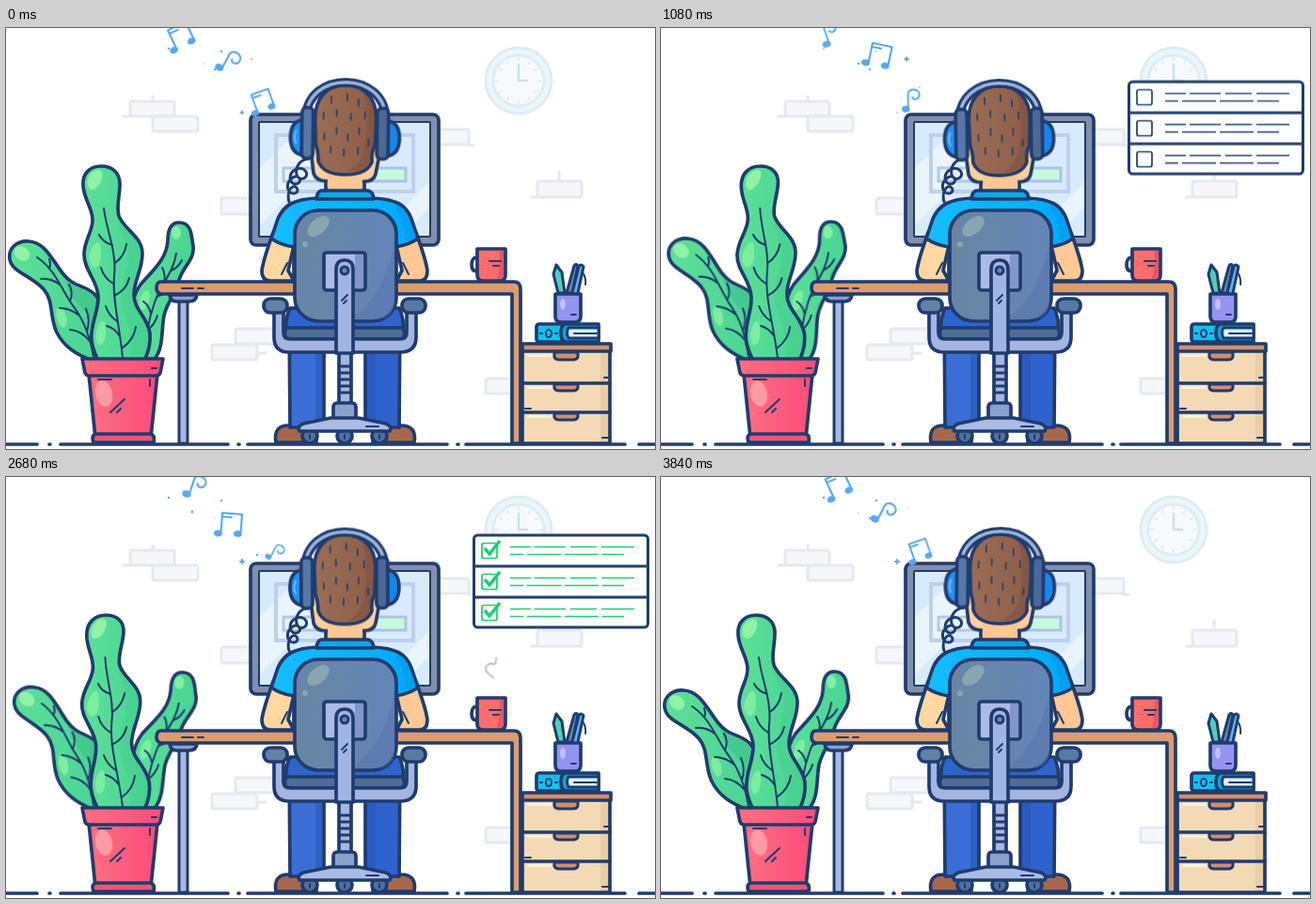
An HTML page that plays this animation: 690 by 448 pixels, repeating every 3.88 s.

```html
<!DOCTYPE html>
<html lang="en">
<head>
<meta charset="utf-8">
<title>Working at the desk</title>
<style>
html, body { margin: 0; width: 100%; height: 100%; overflow: hidden; background: #fff; }
svg { display: block; width: 690px; height: 448px; }
.ink { stroke: #203c6e; stroke-width: 3.7; stroke-linecap: round; stroke-linejoin: round; }
.mid { stroke-width: 3; }
.thin { stroke-width: 2; }
.hair { stroke-width: 1.6; }
.line { fill: none; }
.bare { stroke: none; }
.wall { fill: #f5f7fa; stroke: #e5e9f0; stroke-width: 3; stroke-linecap: round; stroke-linejoin: round; }

.sway { animation: 1940ms cubic-bezier(.37, 0, .63, 1) infinite alternate; }
#leafL { transform-origin: 100px 352px; animation-name: leanL; }
#leafR { transform-origin: 150px 352px; animation-name: leanR; animation-delay: -2910ms; }
#head { transform-origin: 360px 150px; animation-name: nod; animation-duration: 970ms; animation-delay: -1770ms; }
@keyframes leanL { to { transform: rotate(3.8deg); } }
@keyframes leanR { from { transform: rotate(-1.55deg); } to { transform: rotate(1.55deg); } }
@keyframes nod { from { transform: rotate(.8deg); } to { transform: translateY(1px) rotate(-.8deg); } }

.note { fill: none; stroke: #55a7f5; stroke-width: 2.2; stroke-linecap: round; stroke-linejoin: round;
  animation: drift 3880ms linear infinite, 3880ms ease-in-out infinite; }
.dot { fill: #55a7f5; stroke: none; }
.pair { animation-name: drift, swingPair; }
.solo { animation-name: drift, swingSolo; }
@keyframes drift {
  0%, 6% { translate: 312px 95px; scale: .2; opacity: 0; }
  9% { translate: 307px 86px; scale: .55; opacity: .7; }
  17% { translate: 290px 80px; scale: .7; opacity: 1; }
  25% { translate: 271px 78px; scale: .9; }
  34% { translate: 248px 75px; scale: .95; }
  42% { translate: 238px 55px; scale: 1; }
  50% { translate: 235px 35px; scale: 1; }
  59% { translate: 221px 14px; scale: 1; }
  67% { translate: 204px 10px; scale: 1; }
  75% { translate: 184px 9px; scale: 1; opacity: 1; }
  84% { translate: 161px 4px; scale: .75; opacity: .9; }
  92%, 100% { translate: 148px -14px; scale: .5; opacity: 0; }
}
@keyframes swingPair {
  0%, 15% { rotate: 10deg; } 25% { rotate: -20deg; } 34% { rotate: -5deg; }
  53% { rotate: 12deg; } 75%, 100% { rotate: -25deg; }
}
@keyframes swingSolo {
  0%, 9% { rotate: 0deg; } 20% { rotate: 28deg; } 30% { rotate: -4deg; } 42% { rotate: 8deg; }
  50% { rotate: 28deg; } 59% { rotate: 12deg; } 70% { rotate: 18deg; } 79%, 100% { rotate: -20deg; }
}
.spark { stroke: #55a7f5; stroke-width: 2; stroke-linecap: round; animation: spark 970ms linear infinite; }
@keyframes spark { 0%, 75%, 100% { scale: 0; } 20%, 55% { scale: 1; } }

#list { animation: show 3880ms linear infinite; }
@keyframes show { 0%, 7% { opacity: 0; } 16%, 77% { opacity: 1; } 92%, 100% { opacity: 0; } }
#bob { animation: bob 970ms infinite; animation-delay: -630ms; }
@keyframes bob {
  0%, 100% { transform: translateY(52px); animation-timing-function: cubic-bezier(.37, 0, .63, 1); }
  36% { transform: translateY(62px); animation-timing-function: cubic-bezier(.5, 0, .75, .8); }
}
#steam { animation: steam 3880ms linear infinite; }
@keyframes steam {
  0%, 40% { stroke-dasharray: 0 0 0 2; transform: none; opacity: 0; }
  41% { opacity: 1; }
  57%, 62% { stroke-dasharray: 0 0 1 2; transform: none; }
  79% { stroke-dasharray: 0 .78 .22 2; transform: translate(-6px, -8px); opacity: 1; }
  83%, 100% { stroke-dasharray: 0 1 0 2; transform: translate(-7px, -10px); opacity: 0; }
}
</style>
</head>
<body>
<svg viewBox="0 0 690 448">
<defs>
  <linearGradient id="shirt"><stop offset="0" stop-color="#16bdff"/><stop offset="1" stop-color="#00a8fb"/></linearGradient>
  <linearGradient id="pad"><stop offset="0" stop-color="#6886a3"/><stop offset="1" stop-color="#6385b8"/></linearGradient>
  <linearGradient id="hair"><stop offset="0" stop-color="#9c6d55"/><stop offset="1" stop-color="#8c5d49"/></linearGradient>
  <linearGradient id="leaf"><stop offset="0" stop-color="#5ce098"/><stop offset="1" stop-color="#4ad394"/></linearGradient>
  <linearGradient id="pot"><stop offset="0" stop-color="#ff6f80"/><stop offset="1" stop-color="#fb4c7c"/></linearGradient>
  <clipPath id="screen"><path d="M269 100H451V222H269Z"/></clipPath>
  <g id="pair"><path d="M-8 11V-11H13V10M-8 -7H2"/><ellipse class="dot" cx="-11" cy="11" rx="4.6" ry="3.6"/><ellipse class="dot" cx="10" cy="10" rx="4.6" ry="3.6"/></g>
  <g id="solo"><path d="M-1 10V-8C0 -15 13 -13 12 -6C11 0 4 0 4 -4"/><ellipse class="dot" cx="-4" cy="10" rx="4.8" ry="3.8"/></g>
</defs>

<g class="wall">
  <rect x="132" y="78" width="47" height="16" rx="2"/><rect x="156" y="94" width="48" height="16" rx="2"/>
  <rect x="445" y="108" width="47" height="16" rx="2"/><rect x="565" y="163" width="47" height="17" rx="2"/>
  <rect x="229" y="181" width="47" height="17" rx="2"/><rect x="244" y="320" width="47" height="16" rx="2"/>
  <rect x="219" y="337" width="48" height="16" rx="2"/><rect x="510" y="373" width="40" height="16" rx="2"/>
  <path class="line" d="M125 94h7M156 73v5M492 125h5M559 180h6M588 153v8M267 346h9"/>
</g>
<g stroke="#e0ecf3" stroke-width="3" stroke-linecap="round">
  <circle cx="545" cy="56" r="35" fill="#eaf6fa"/><circle cx="545" cy="56" r="27" fill="#f6fafc"/>
  <path class="line" stroke="#cfdeed" stroke-width="2.5" d="M545 39V56H554"/>
  <path class="line" stroke-width="2" d="M545 32v2M545 78v2M521 56h2M567 56h2M533 36l1 2M557 36l-1 2M525 44l2 1M565 44l-2 1M525 68l2 -1M565 68l-2 -1M533 76l1 -2M557 76l-1 -2"/>
</g>

<g id="list">
  <g id="bob">
    <rect class="ink mid" x="497.5" width="185" height="98" rx="4" fill="#fff"/>
    <path class="ink mid" d="M498 33H682M498 66H682"/>
  </g>
</g>

<!-- monitor -->
<rect class="ink" x="260" y="92" width="200" height="139" rx="6" fill="#8190ac"/>
<rect x="269" y="100" width="182" height="122" fill="#d8eafd"/>
<g clip-path="url(#screen)">
  <path fill="#e9f4ff" d="M269 150L320 100H380L269 211ZM392 222L451 163V190L420 222Z"/>
  <rect x="287" y="114" width="146" height="60" fill="none" stroke="#bdd0ec" stroke-width="4"/>
  <rect x="295" y="149" width="60" height="14" fill="#e7f3ff" stroke="#b4c8e7" stroke-width="3"/>
  <rect x="375" y="149" width="50" height="14" fill="#c8f8e0" stroke="#acc3e6" stroke-width="3"/>
</g>
<rect class="ink line thin" x="269" y="100" width="182" height="122" rx="1"/>

<!-- plant -->
<g id="leafL" class="sway">
  <path class="ink" fill="url(#leaf)" d="M24 227C11 226 2 235 4 246C6 260 28 264 40 278C51 290 46 308 54 324C62 340 76 348 92 354L106 354C108 330 106 296 94 283C83 273 72 276 61 262C49 247 42 228 24 227Z"/>
  <path class="bare" fill="#38bd87" opacity=".5" d="M63 267C75 278 91 278 96 291C103 309 102 330 100 350C92 335 93 315 83 301C75 291 65 284 63 267Z"/>
  <ellipse cx="17" cy="240" rx="9" ry="7" fill="#8ff2a6" transform="rotate(35 17 240)"/>
  <ellipse cx="59" cy="308" rx="5" ry="11" fill="#7deda0" transform="rotate(-15 59 308)"/>
  <path class="ink line thin" d="M33 244C54 258 60 282 73 298C84 313 90 333 93 350M46 256Q48 251 46 246M57 273Q48 266 37 267M68 291Q72 281 67 273M78 306Q68 298 57 298M86 323Q90 310 85 299M89 333Q80 322 68 321"/>
</g>
<g id="leafR" class="sway">
  <path class="ink" fill="url(#leaf)" d="M184 207C174 207 172 216 172 226C171 246 156 258 143 273C130 290 130 320 138 352H158C168 340 165 320 168 306C171 292 180 284 184 268C188 254 201 246 199 232C197 222 198 207 184 207Z"/>
  <ellipse cx="181" cy="218" rx="5" ry="7" fill="#84efa3"/>
  <ellipse cx="147" cy="290" rx="5" ry="11" fill="#7deda0" transform="rotate(18 147 290)"/>
  <path class="ink line thin" d="M181 240C178 260 164 274 158 292C151 312 148 332 148 350M176 258Q183 255 187 247M168 272Q170 262 166 255M160 286Q169 284 174 275M154 304Q152 295 146 291M150 322Q158 316 161 306"/>
</g>
<g id="leafM">
  <path class="ink" fill="url(#leaf)" d="M101,147 C89,147 81,155 82,168 C83,182 91,190 92,203 C93,216 83,225 83,241 C83,258 97,268 98,285 C99,302 89,315 91,333 C92,342 95,347 98,354 L147,354 C152,344 154,336 153,325 C151,308 136,300 136,284 C136,268 145,258 145,240 C145,222 125,214 120,200 C117,190 121,180 121,166 C121,154 113,147 101,147Z"/>
  <path fill="#3cc68d" opacity=".3" d="M119,204 C126,217 142,224 142,240 C142,258 133,268 133,285 C134,301 149,309 150,325 C151,336 149,344 145,350 L132,350 C139,330 123,306 123,285 C123,264 132,256 130,240 C128,226 121,216 119,204Z"/>
  <path fill="#8ff2a6" d="M97,151 C89,153 85,161 87,168 C89,174 94,173 98,168 C103,162 105,150 97,151Z"/>
  <path fill="#7deda0" d="M95,229 C88,236 86,248 92,254 C98,257 101,249 101,242 C101,235 101,225 95,229Z"/>
  <path fill="#7deda0" d="M101,313 C95,319 94,331 98,337 C103,339 106,331 106,324 C106,317 106,309 101,313Z"/>
  <path class="ink line thin" d="M104,192 C107,216 118,238 115,264 C113,290 121,318 124,351 M113,231 Q103,228 99,220 M116,250 Q126,243 128,230 M114,272 Q104,266 101,255 M115,285 Q128,279 131,266 M118,312 Q109,306 106,296 M121,328 Q115,319 107,317 M123,341 Q136,332 138,318"/>
</g>
<g class="ink">
  <path fill="url(#pot)" d="M88 368L95 436H154L161 368Z"/>
  <path fill="#f0547b" d="M93 441Q90 432 97 432H152Q159 432 157 441Z"/>
  <path fill="url(#pot)" d="M81 352H167L164 367Q163 370 159 370H89Q85 370 84 367Z"/>
  <ellipse class="bare" cx="104" cy="389" rx="9" ry="14" fill="#ff9aa0" transform="rotate(-12 104 389)"/>
  <path class="line thin" d="M111 409L126 395M118 409L122 405M155 362H160M153 374V381M98 374H112"/>
</g>

<!-- trousers and shoes -->
<g class="ink">
  <path fill="#a7674f" d="M287 441Q284 423 300 423H330V441ZM434 441Q437 423 420 423H390V441Z"/>
  <path fill="#3a6ed6" d="M301 300H338V425H302Z"/><path fill="#2f62cc" d="M419 300H382V425H418Z"/>
  <path class="bare" fill="#2957bb" opacity=".6" d="M329 345H336V423H329ZM384 345H393V423H384Z"/>
  <path fill="#2f64cd" d="M302 298H418Q424 310 422 326H298Q296 310 302 298Z"/>
</g>

<!-- desk -->
<g class="ink">
  <rect class="mid" x="184" y="288" width="9" height="154" fill="#a9b9df"/>
  <path fill="#8d9fca" d="M174 284H203Q202 291 195 291H181Q175 291 174 284Z"/>
  <path fill="#dc9c6b" d="M165 270H540Q547 270 547 278V442H538V283H165Q160 282 160 277Q160 270 165 270Z"/>
  <path class="line thin" d="M187 277H199M204 277H210"/>
</g>

<!-- arms, shirt, neck -->
<g class="ink">
  <path fill="#ffd7a0" d="M284 218Q274 245 272 258Q272 269 281 269H306L300 258L306 232Z"/>
  <path fill="#ffc894" d="M436 218Q446 245 448 258Q448 269 440 269H415L421 258L415 232Z"/>
  <path class="line thin" d="M299 250L293 262M422 250L428 262"/>
  <path fill="url(#shirt)" d="M332 181H389C415 182 425 188 431 203L438 224Q428 231 414 233V270H306V233Q292 231 282 224L289 203C296 188 306 182 332 181Z"/>
  <path class="bare" fill="#0090e4" opacity=".4" d="M422 191Q432 208 436 222L424 227Q426 206 412 190Z"/>
  <path fill="#ffc28f" d="M340 145H381V176H340Z"/>
  <path fill="#0ba9ee" d="M335 173H385Q390 174 391 182H330Q331 174 335 173Z"/>
</g>

<path class="ink line mid" d="M322 139C313 140 307 147 309 156C312 164 322 160 319 153C315 146 302 150 302 160C303 169 315 167 312 160C308 154 297 163 300 172C303 179 313 176 309 170C304 165 298 175 301 185"/>

<!-- head and headphones -->
<g id="head" class="ink sway">
  <path fill="#ffcf9c" d="M330 116Q322 122 325 139L327 155Q330 163 340 163H381Q391 163 393 155L396 139Q398 122 391 116Z"/>
  <path class="bare" fill="#ffc793" d="M342 150H379V169H342Z"/>
  <path fill="url(#hair)" d="M360 61C339 61 328 76 328 96L329 124Q332 132 332 142Q337 156 360 156Q384 156 389 142Q388 132 392 124L393 96C393 76 382 61 360 61Z"/>
  <path class="bare" fill="#74483f" opacity=".35" d="M378 67Q392 79 391 99L389 124L386 141Q382 152 362 153Q379 145 381 124Q387 91 378 67Z"/>
  <path id="strands" class="line hair"/>
  <path class="line" style="stroke-width:9.5" d="M318 97C318 44.500 403 44.500 403 97"/>
  <path class="line" style="stroke:#9db3dc;stroke-width:3.500" d="M318 97C318 44.500 403 44.500 403 97"/>
  <path fill="#2190f7" d="M316 98Q302 99 302 117Q302 134 316 136Z"/>
  <path fill="#1686ee" d="M404 98Q418 99 418 117Q418 134 404 136Z"/>
  <path class="line thin" style="stroke:#6cbcff" d="M308 110Q305 117 308 123"/>
  <rect x="314" y="85" width="12" height="54" rx="5" fill="#5877a9"/>
  <rect x="394" y="85" width="12" height="54" rx="5" fill="#4b6899"/>
</g>

<!-- chair -->
<g class="ink">
  <path fill="#4f6d99" d="M298 319H422Q427 331 417 331H303Q293 331 298 319Z"/>
  <rect x="307" y="194" width="108" height="118" rx="25" fill="url(#pad)"/>
  <path class="bare" fill="#5a74ad" opacity=".5" d="M413 230V290Q413 310 392 310H365Q400 290 413 230Z"/>
  <ellipse class="bare" cx="332" cy="211" rx="14" ry="8" fill="#8aa5b2" transform="rotate(-42 332 211)"/>
  <circle class="bare" cx="318" cy="230" r="3" fill="#8aa5b2"/>
  <path fill="#a4b5e2" d="M285 302V329Q285 345 301 345H419Q436 345 436 329V302H426V324Q426 331 419 331H302Q295 331 295 324V302Z"/>
  <rect x="274" y="288" width="25" height="15" rx="7" fill="#6381a6"/><rect x="421" y="288" width="25" height="15" rx="7" fill="#5a78a4"/>
  <rect x="338" y="239" width="44" height="40" rx="3" fill="#abbbe7"/>
  <path class="bare" fill="#8296cc" d="M371 241H380V277H371Z"/>
  <rect x="354" y="345" width="13" height="56" fill="#a6b6df"/>
  <path class="line mid" d="M354 360H367M354 367H367M354 374H367M354 381H367M354 388H367"/>
  <path fill="#a2b4e3" d="M351 346V257Q351 247 360 247Q369 247 369 257V346Z"/>
  <circle class="mid" cx="360" cy="258" r="4" fill="#6e83b6"/>
  <path class="line thin" d="M357 290L363 284M359 293L362 290"/>
  <circle cx="323" cy="434" r="8" fill="#526f9f"/><circle cx="360" cy="434" r="8" fill="#526f9f"/><circle cx="397" cy="434" r="8" fill="#526f9f"/>
  <rect x="348" y="399" width="24" height="19" rx="4" fill="#8aa0cf"/>
  <path fill="#aabbe5" d="M345 415H375L404 421Q411 424 408 429H312Q309 424 316 421Z"/>
  <path class="line thin" d="M323 433V437M360 433V437M397 433V437M383 424H396"/>
</g>

<!-- mug -->
<g class="ink">
  <path class="line" d="M502 244H500Q495 245 495 252Q495 259 501 259H503"/>
  <path fill="#ff6c6c" d="M501 235H531V263Q531 269 525 269H507Q501 269 501 263Z"/>
  <path class="bare" fill="#ee5166" d="M525 237H529V262Q528 267 522 267Q526 255 525 237Z"/>
  <path class="line thin" d="M514 248H526M518 253H524"/>
</g>
<path id="steam" class="line" pathLength="1" stroke="#b0c1ee" stroke-width="2" d="M515 231C527 223 522 217 516 213C508 207 516 200 520 202C524 204 523 199 524 195"/>

<!-- drawers -->
<g class="ink">
  <rect x="549" y="343" width="93" height="99" fill="#f3dab5"/>
  <path class="bare" fill="#e6c399" opacity=".6" d="M632 346H640V440H632Z"/>
  <path class="line" d="M549 378H642M549 409H642"/>
  <path class="bare" fill="#fff0d6" d="M554 347H580V350H554ZM554 381H580V384H554ZM554 412H580V415H554Z"/>
  <path class="mid" fill="#d88c65" d="M583 345H608V350Q607 353 603 353H588Q584 353 583 350ZM583 379H608V383Q607 386 603 386H588Q584 386 583 383ZM583 410H608V414Q607 417 603 417H588Q584 417 583 414Z"/>
  <path class="line thin" d="M636 372H641M552 405H558M634 436H641"/>
  <rect x="549" y="336" width="94" height="8" fill="#d98e68"/>
  <rect x="564" y="315" width="28" height="19" rx="3" fill="#13c0ee"/>
  <path fill="#0aa6e0" d="M630 315H596Q590 315 590 324Q590 334 596 334H630Z"/>
  <path class="mid" fill="#d9f1ff" d="M630 319H598Q595 324 598 330H630Z"/>
  <path class="line thin" d="M604 325H628"/>
  <ellipse class="line thin" cx="577" cy="325" rx="3" ry="4"/>
  <path class="line thin" d="M568 325H570M584 325H586"/>
  <path class="mid" fill="#4fcfb5" d="M587 282L582 262L585 252L591 260L594 282Z"/>
  <path class="mid" fill="#7387ac" d="M596 282L604 253Q606 250 608 253L602 282Z"/>
  <path class="mid" fill="#5bb3ff" d="M602 282L609 254Q611 250 614 254L608 282"/>
  <path class="line thin" d="M613 260Q617 266 616 273"/>
  <path fill="#9693f0" d="M584 283H611V307Q611 313 605 313H590Q584 313 584 307Z"/>
  <ellipse class="bare" cx="592" cy="294" rx="3" ry="6" fill="#c0beff"/>
  <path class="line thin" d="M601 305H606"/>
</g>

<path class="ink" d="M0 443H33M46 443H47M58 443H236M247 443H248M257 443H469M480 443H481M489 443H658M673 443H690"/>
<g id="music"></g>
</svg>
<script>
const LOOP = 3880;
const $ = id => document.getElementById(id);

const strands = [[345, 73], [362, 70], [374, 76], [337, 90], [351, 87], [366, 91], [381, 89], [338, 112],
  [351, 106], [363, 113], [375, 106], [385, 118], [345, 126], [359, 129], [374, 127]];
$('strands').setAttribute('d', strands.map(([x, y]) => `M${x} ${y}v7`).join(''));

// The middle leaf bends in an S that is anchored at the pot.
const bend = (x, y) => {
  const u = Math.max(0, (352 - y) / 207);
  return x - 8 * Math.sin(4.5 * u) * u ** .7;
};
for (const path of $('leafM').children) {
  const rest = path.getAttribute('d');
  const bent = rest.replace(/([\d.]+),([\d.]+)/g, (_, x, y) => `${bend(+x, +y).toFixed(2)},${y}`);
  path.animate({ d: [`path("${rest}")`, `path("${bent}")`] },
    { duration: LOOP / 2, iterations: Infinity, direction: 'alternate', easing: 'cubic-bezier(.37,0,.63,1)' });
}

// Checklist rows turn green one after another.
const NAVY = '#203c6e', GREEN = '#16cf70';
const turn = (el, prop, from, to, start, end) => el.animate([
  { [prop]: from, offset: 0 }, { [prop]: from, offset: start / LOOP },
  { [prop]: to, offset: end / LOOP }, { [prop]: to, offset: 1 }
], { duration: LOOP, iterations: Infinity });

for (let i = 0; i < 3; i++) {
  $('bob').insertAdjacentHTML('beforeend', `<g fill="none" stroke-width="1.7" transform="translate(0 ${i * 33})">
    <g><rect x="506" y="8.5" width="16" height="16" rx="2"/>
    <path d="M536 12.5H558M562 12.5H595M600 12.5H628M633 12.5H668M536 20.5H550M554 20.5H590M594 20.5H630M634 20.5H657"/></g>
    <path d="M509 14L514 20L525 6" stroke="${GREEN}" stroke-width="3.5" pathLength="1" stroke-dasharray="1 2"/></g>`);
  const [row, tick] = $('bob').lastElementChild.children;
  const start = 1040 + 600 * i;
  turn(row, 'stroke', NAVY, GREEN, start, start + 350);
  turn(tick, 'strokeDashoffset', 1, 0, start + 80, start + 380);
  turn(tick, 'opacity', 0, 1, start + 79, start + 81);
}

// Notes leave the headphones in turn, among twinkling sparks.
const note = (kind, delay) => `<g class="note ${kind}" style="animation-delay:${-delay}ms"><use href="#${kind}"/></g>`;
const spark = (x, y, size, start) => `<g transform="translate(${x} ${y})">
  <path class="spark" style="animation-delay:${start - 970}ms" d="M${-size} 0H${size}M0 ${-size}V${size}"/></g>`;
$('music').innerHTML =
  note('solo', 0) + note('solo', LOOP / 2) + note('pair', LOOP / 4) + note('pair', LOOP * 3 / 4) +
  [[251, 90, 2, 400], [198, 37, 2, 130], [261, 33, 2, -60], [173, 22, .2, 450], [229, 25, .2, 450],
   [275, 63, .2, 0], [267, 83, .2, 200], [222, 44, .2, 700], [210, 38, .2, -100]].map(s => spark(...s)).join('');
</script>
</body>
</html>
```
